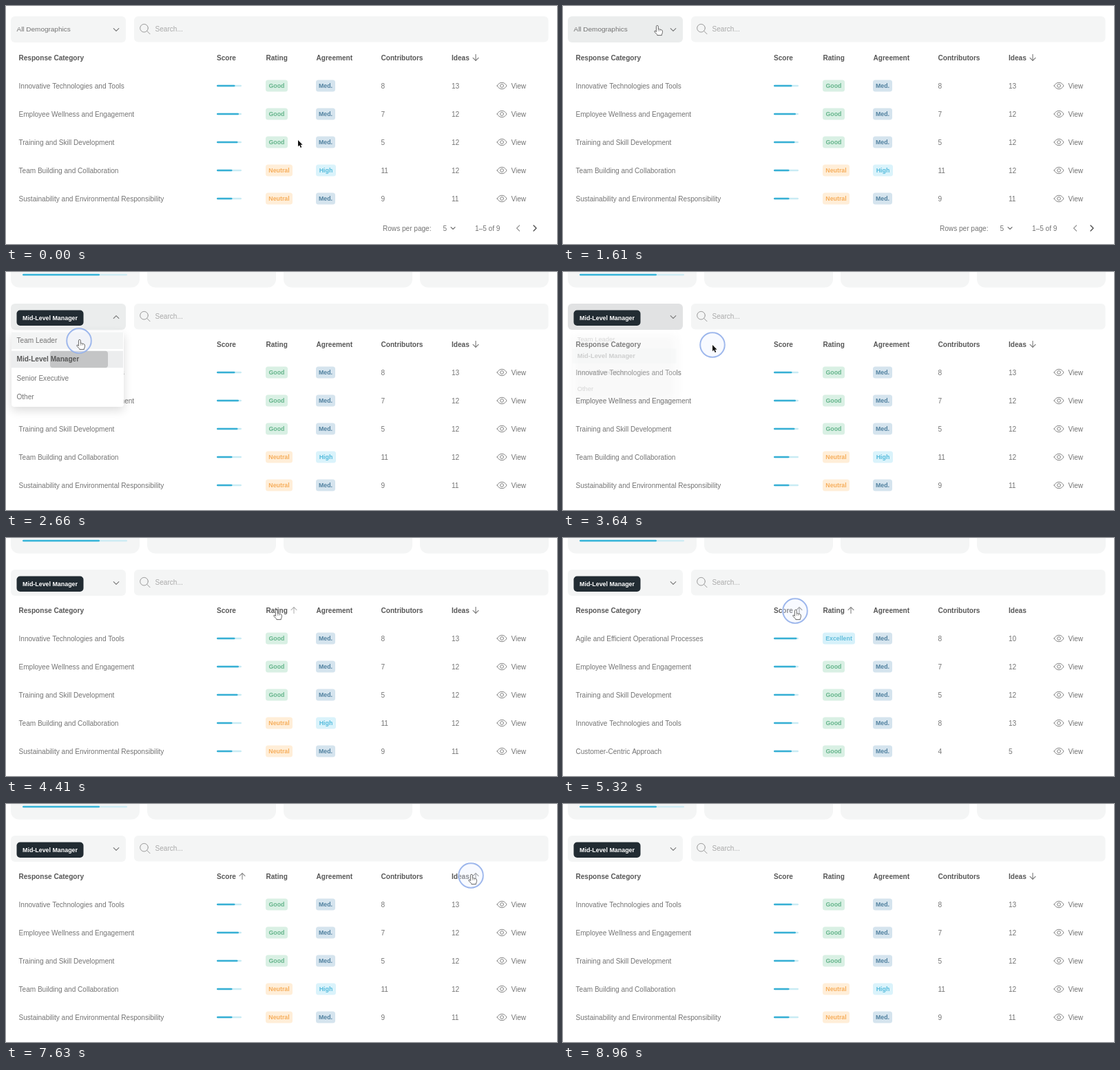
Write an HTML page with a canvas that moves like this. It is 800 by 346 pixels and loops after 9.03 s.

```html
<!DOCTYPE html>
<html lang="en">
<head>
<meta charset="utf-8">
<title>Response table</title>
<style>
html, body { margin: 0; width: 100%; height: 100%; overflow: hidden; background: #fff; }
canvas { display: block; width: 800px; height: 346px; }
</style>
</head>
<body>
<canvas id="stage" width="800" height="346"></canvas>
<script>
const ctx = document.getElementById('stage').getContext('2d');
const LOOP = 9030, STEP = 70;
const FONT = '"Liberation Sans", Arial, sans-serif';
const INK = '#747474', DARK = '#575757', PANEL = '#f4f5f5';

const OPEN = 1750, SELECT = 2570, CLOSE = 3540;
const CLICKS = [OPEN, SELECT, CLOSE, 4500, 5300, 7600];
const SORTS = [
  { at: -1000, col: 'Ideas' },
  { at: 4500, col: 'Rating' },
  { at: 5300, col: 'Score' },
  { at: 7600, col: 'Ideas' }
];
const OPTIONS = ['Team Leader', 'Mid-Level Manager', 'Senior Executive', 'Other'];

// label, left edge, x of the sort arrow
const COLUMNS = [
  ['Response Category', 18.5], ['Score', 306, 343], ['Rating', 377.5, 418],
  ['Agreement', 450.5, 512], ['Contributors', 544.5, 615], ['Ideas', 647, 682]
];
const BADGES = {
  Good: [32, '#d9f0e4', '#66b58c'], Neutral: [39, '#ffeed8', '#f6ae5c'],
  Excellent: [47, '#d6f1fa', '#62bddb'], 'Med.': [28, '#d5e4ee', '#51809f'],
  High: [29, '#daf3fb', '#54bbdc']
};

const row = (name, score, rating, agree, people, ideas) => ({ name, score, rating, agree, people, ideas });
const innovative = row('Innovative Technologies and Tools', 26.5, 'Good', 'Med.', 8, 13);
const wellness = row('Employee Wellness and Engagement', 32, 'Good', 'Med.', 7, 12);
const training = row('Training and Skill Development', 30.5, 'Good', 'Med.', 5, 12);
const team = row('Team Building and Collaboration', 22.5, 'Neutral', 'High', 11, 12);
const sustain = row('Sustainability and Environmental Responsibility', 22.5, 'Neutral', 'Med.', 9, 11);
const agile = row('Agile and Efficient Operational Processes', 33.5, 'Excellent', 'Med.', 8, 10);
const customer = row('Customer-Centric Approach', 26, 'Good', 'Med.', 4, 5);
const ORDER = {
  Ideas: [innovative, wellness, training, team, sustain],
  Rating: [agile, innovative, wellness, training, customer],
  Score: [agile, wellness, training, innovative, customer]
};

// pointer stops: time, x, y
const PATH = [
  [0, 424, 195], [280, 424, 195], [1300, 136, 30], [1890, 136, 30], [2380, 106, 100],
  [2870, 106, 100], [3430, 217, 106], [3780, 217, 106], [4380, 392, 106], [4760, 392, 106],
  [5180, 337, 106], [5880, 337, 106], [7350, 675, 104], [7900, 675, 104], [8500, 692, -30]
];
const HAND = new Path2D('M-1.6 7V.8a1.4 1.4 0 0 1 2.9 0V4.8Q3 4 3.7 5.2 5.4 4.7 5.9 6 7.4 5.9 7.4 7.4V9.4Q7.3 11 6.4 12.2V13.6H-.2V12.6L-4 8.8Q-4.7 7-3 7.1L-1.6 8.3Z');
const ARROW = new Path2D('M0 0V9.2L2.1 7.3 3.7 11 5.3 10.3 3.7 6.8H6.6Z');

const clamp = v => Math.max(0, Math.min(1, v));
const smooth = v => v * v * (3 - 2 * v);

function text(str, x, y, { size = 10.07, color = INK, bold = false, align = 'left' } = {}) {
  ctx.font = `${bold ? 'bold ' : ''}${size}px ${FONT}`;
  ctx.fillStyle = color;
  ctx.textAlign = align;
  ctx.fillText(str, x, y + size * 0.35);
}

function box(x, y, w, h, r, color) {
  ctx.fillStyle = color;
  ctx.beginPath();
  ctx.roundRect(x, y, w, h, r);
  ctx.fill();
}

function line(points, color, width) {
  ctx.strokeStyle = color;
  ctx.lineWidth = width;
  ctx.beginPath();
  points.forEach(([x, y]) => ctx.lineTo(x, y));
  ctx.stroke();
}

function circle(x, y, r, color, width) {
  ctx.strokeStyle = color;
  ctx.lineWidth = width;
  ctx.beginPath();
  ctx.arc(x, y, r, 0, Math.PI * 2);
  ctx.stroke();
}

function chevron(x, y, dx, dy, color = '#777') {
  line([[x - dx, y - dy], [x + (dy ? 0 : dx), y + dy], [x + dx, y - dy]], color, 1.1);
}

function sideChevron(x, y, dir, color) {
  line([[x - 2 * dir, y - 4], [x + 2 * dir, y], [x - 2 * dir, y + 4]], color, 1.2);
}

function pointerAt(t) {
  const i = PATH.findIndex(p => p[0] > t);
  if (i < 0) return { x: PATH.at(-1)[1], y: PATH.at(-1)[2] };
  const [t0, x0, y0] = PATH[i - 1], [t1, x1, y1] = PATH[i];
  const k = smooth((t - t0) / (t1 - t0));
  return { x: x0 + (x1 - x0) * k, y: y0 + (y1 - y0) * k };
}

function sortArrow(x, y, turn, alpha) {
  ctx.save();
  ctx.globalAlpha = alpha;
  ctx.translate(x, y);
  ctx.rotate(Math.PI * turn);
  line([[0, -4.5], [0, 4]], '#777', 1.1);
  line([[-4, 0.4], [0, 4.4], [4, 0.4]], '#777', 1.1);
  ctx.restore();
}

function drawHeader(t, y, pointer) {
  const index = SORTS.findLastIndex(s => s.at <= t);
  const active = SORTS[index], previous = SORTS[index - 1];
  const since = t - active.at;
  for (const [label, x, arrowX] of COLUMNS) {
    text(label, x, y, { bold: true, color: DARK });
    if (!arrowX) continue;
    const hover = Math.abs(pointer.y - y) < 11 && pointer.x > x && pointer.x < arrowX + 6;
    if (label === active.col) sortArrow(arrowX, y, 1 - smooth(clamp((since - 60) / 220)), 1);
    else if (previous && label === previous.col && since < 220) sortArrow(arrowX, y, 1, 1 - since / 260);
    else if (hover) sortArrow(arrowX, y, 1, 0.55);
  }
  return active.col;
}

function badge(label, x, y) {
  const [w, fill, ink] = BADGES[label];
  box(x, y - 8.5, w, 17, 3.5, fill);
  text(label, x + w / 2, y, { size: 8.8, bold: true, color: ink, align: 'center' });
}

function drawEye(x, y) {
  ctx.strokeStyle = '#858585';
  ctx.lineWidth = 1;
  ctx.beginPath();
  ctx.moveTo(x - 7, y);
  ctx.bezierCurveTo(x - 3.5, y - 6.3, x + 3.5, y - 6.3, x + 7, y);
  ctx.bezierCurveTo(x + 3.5, y + 6.3, x - 3.5, y + 6.3, x - 7, y);
  ctx.stroke();
  circle(x, y, 2.4, '#858585', 1);
}

function drawRow(r, y) {
  text(r.name, 18.5, y);
  box(306, y - 1.3, 36, 2.6, 1.3, '#c8ebf4');
  box(306, y - 1.3, r.score, 2.6, 1.3, '#36afd4');
  badge(r.rating, 377, y);
  badge(r.agree, 450, y);
  text(r.people, 544.5, y);
  text(r.ideas, 647, y);
  drawEye(720, y);
  text('View', 733.5, y);
}

function drawCards() {
  for (let i = 0; i < 4; i++) box(7 + i * 198, -60, 187, 82.5, 12, PANEL);
  box(24, 2.7, 152, 2.6, 1.3, '#cdebf3');
  box(24, 2.7, 112, 2.6, 1.3, '#36b4d8');
}

function drawFilters(t, shift, pointer) {
  const y = 34 + shift + (shift ? 1 : 0);
  const hover = pointer.x > 7 && pointer.x < 173 && Math.abs(pointer.y - y) < 19;
  let fill = PANEL;
  if (t >= CLOSE && t < CLOSE + 350) fill = '#e1e2e3';
  else if (hover || (t >= OPEN && t < CLOSE)) fill = '#ebeded';
  box(7, y - 19, 167, 38, 6, fill);
  box(186, y - 19, 601.5, 37.5, 6, PANEL);

  if (shift) {
    box(15.5, y - 9.5, 97, 22.5, 5, '#222c33');
    text('Mid-Level Manager', 64, y + 1.7, { size: 8.9, bold: true, color: '#fff', align: 'center' });
  } else {
    text('All Demographics', 15.5, y, { size: 9.97 });
  }
  chevron(160, y + 0.5, 3.8, t >= OPEN && t < CLOSE ? -1.9 : 1.9);

  circle(200.5, y - 1.8, 5.8, '#999', 1);
  line([[204.7, y + 2.4], [209, y + 6.7]], '#999', 1);
  text('Search...', 216.5, y - 0.2, { color: '#aaa' });
}

function drawMenu(t, shift, pointer) {
  const k = t < CLOSE ? smooth(clamp((t - OPEN + 70) / 200)) : 1 - (t - CLOSE) / 200;
  if (t < OPEN || k <= 0) return;
  const top = 56 + shift;
  ctx.save();
  ctx.globalAlpha = k * k;
  ctx.translate(90, top);
  ctx.scale(1 - 0.14 * (1 - k), 1 - 0.24 * (1 - k));
  ctx.translate(-90, -top);
  ctx.shadowColor = 'rgba(0,0,0,.14)';
  ctx.shadowBlur = 14;
  ctx.shadowOffsetY = 5;
  box(8, top, 163, 110, 4, '#fff');
  ctx.shadowColor = 'transparent';
  OPTIONS.forEach((label, i) => {
    const y = top + 13.5 + i * 27.3;
    const selected = i === 1 && t >= SELECT;
    const hover = pointer.x > 8 && pointer.x < 171 && Math.abs(pointer.y - y) < 13;
    if (selected || hover) box(8, y - 12, 162, 24.5, 0, selected ? '#ecedee' : '#f3f4f4');
    const ripple = t - SELECT;
    if (selected && ripple < 280) {
      const r = 42 * clamp((ripple + 10) / 100);
      box(106 - r, y - 12, r * 2, 24.5, 4, `rgba(0,0,0,${0.17 * (1 - clamp((ripple - 90) / 190))})`);
    }
    text(label, 15.5, y, { bold: selected, color: selected ? DARK : INK });
  });
  ctx.restore();
}

function drawPager(y) {
  text('Rows per page:', 547, y);
  text('5', 634.5, y);
  chevron(649, y, 3, 1.5);
  text('1–5 of 9', 681, y);
  sideChevron(743.5, y, -1, '#999');
  sideChevron(768, y, 1, '#444');
}

function drawPointer(t, { x, y }, shift) {
  const click = CLICKS.findLast(c => c <= t + 60);
  const age = t - click;
  if (click !== undefined && age < 290) {
    ctx.globalAlpha = 1 - clamp((age - 170) / 120);
    ctx.fillStyle = 'rgba(235,241,255,.35)';
    circle(x, y, 17.7, '#91aee9', 2);
    ctx.fill();
    ctx.globalAlpha = 1;
  }
  const overFilter = x > 7 && x < 173 && Math.abs(y - 34 - shift) < 19;
  const overMenu = t >= OPEN && t < CLOSE && x < 171 && y < 166 + shift;
  const overHeader = Math.abs(y - 75 - shift) < 11 &&
    COLUMNS.some(([, left, right]) => right && x > left && x < right + 6);
  const hand = overFilter || overMenu || overHeader;
  ctx.save();
  ctx.translate(x + (hand ? 1 : 0), y - (hand ? 1 : 0));
  ctx.strokeStyle = hand ? '#666' : '#fff';
  ctx.fillStyle = hand ? '#fff' : '#111';
  ctx.lineWidth = hand ? 1 : 1.6;
  const shape = hand ? HAND : ARROW;
  if (hand) {
    ctx.fill(shape);
    ctx.stroke(shape);
    line([[1.3, 5], [1.3, 7.4]], '#777', 0.7);
    line([[3.7, 5.4], [3.7, 7.4]], '#777', 0.7);
  } else {
    ctx.stroke(shape);
    ctx.fill(shape);
  }
  ctx.restore();
}

function draw(t) {
  const pointer = pointerAt(t);
  const shift = t >= SELECT + 40 ? 30 : 0;
  ctx.fillStyle = '#fff';
  ctx.fillRect(0, 0, 800, 346);
  ctx.lineCap = ctx.lineJoin = 'round';
  if (shift) drawCards();
  drawFilters(t, shift, pointer);
  const sorted = drawHeader(t, 75 + shift, pointer);
  ORDER[sorted].forEach((r, i) => drawRow(r, 116 + shift + i * 41));
  drawPager(323 + shift);
  drawMenu(t, shift, pointer);
  drawPointer(t, pointer, shift);
}

const start = performance.now();
function tick() {
  const t = (performance.now() - start) % LOOP;
  draw(Math.floor(t / STEP) * STEP);
  requestAnimationFrame(tick);
}
tick();
</script>
</body>
</html>
```
